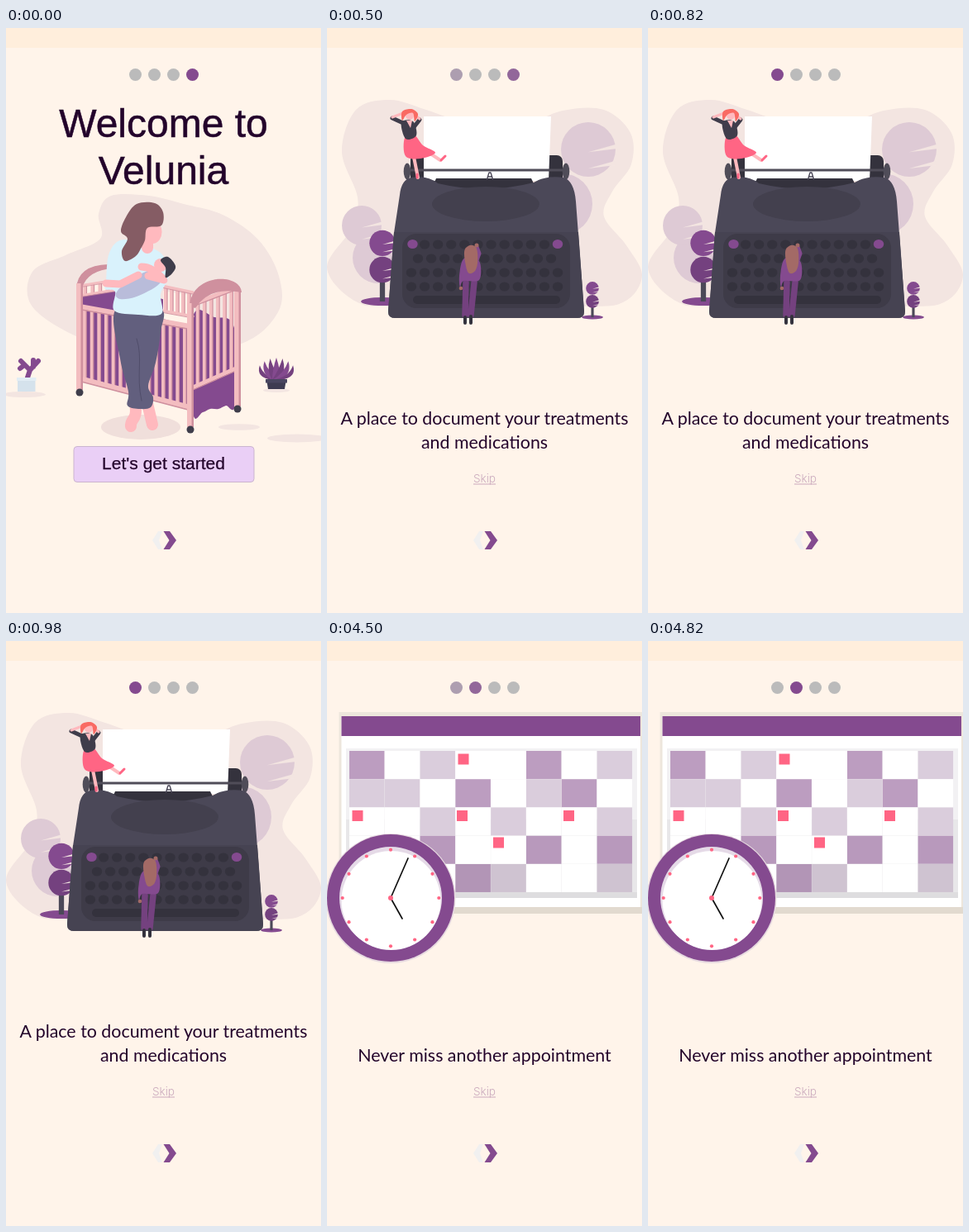
Animation, 381 px wide and 708 px high, one loop 8000 ms. Source, as an HTML page:

```html
<!DOCTYPE html>
<html lang="en">
<head>
<meta charset="utf-8">
<title>Onboarding</title>
<style>
html, body { margin: 0; width: 100%; height: 100%; overflow: hidden; background: #fff4ea; }
svg { display: block; width: 381px; height: 708px; }
text { text-anchor: middle; fill: #23042b; font-variant-ligatures: none; }
.title { font: 48px "Liberation Sans", Arial, sans-serif; stroke: #23042b; stroke-width: .5px; }
.button { font: 21px "Liberation Sans", Arial, sans-serif; stroke: #23042b; stroke-width: .25px; }
.caption { font: 21.4px Lato, "Open Sans", sans-serif; }
.skip { font: 300 13.6px Inter, sans-serif; fill: #cbaabd; }
</style>
</head>
<body>
<svg id="stage" viewBox="0 0 381 708"></svg>
<script>
const PURPLE = '#844a8f', PLUM = '#74417f', BLOB = '#f3e5e1', PINK = '#f3bdc0', ROSE = '#cf909e';
const SKIN = '#ffb9be', TAN = '#a36a66', RED = '#ff6584', DARK = '#34323d', INK = '#3f3d4b', SLATE = '#4b4858';
const LILAC = '#decad5', TROUSERS = '#625f7e', PAPER = '#ffffff';

const path = (d, fill) => `<path d="${d}" fill="${fill}"/>`;
const line = (d, color, w = 1) =>
  `<path d="${d}" fill="none" stroke="${color}" stroke-width="${w}" stroke-linecap="round" stroke-linejoin="round"/>`;
const oval = (x, y, rx, ry, fill) => `<ellipse cx="${x}" cy="${y}" rx="${rx}" ry="${ry}" fill="${fill}"/>`;
const disc = (x, y, r, fill) => oval(x, y, r, r, fill);
const box = (x, y, w, h, fill, r = 0, extra = '') =>
  `<rect x="${x}" y="${y}" width="${w}" height="${h}" rx="${r}" fill="${fill}" ${extra}/>`;
const text = (s, y, cls) => `<text x="190.5" y="${y}" class="${cls}">${s}</text>`;
const repeat = (n, f) => Array.from({ length: n }, (_, i) => f(i)).join('');
const lerp = (a, b, u) => a + (b - a) * u;
const skip = () => text('Skip', 550, 'skip') + box(177, 551.5, 27, 1, '#cbaabd');

// Closed smooth curve through a few points
function smooth(points, fill) {
  const p = points.split(' ').map(s => s.split(',').map(Number)), n = p.length;
  const at = i => p[(i + n) % n];
  const bend = (i, k) => [0, 1].map(a => at(i)[a] + k * (at(i + 1)[a] - at(i - 1)[a]) / 6);
  return path(`M${p[0]}` + repeat(n, i => `C${bend(i, 1)} ${bend(i + 1, -1)} ${at(i + 1)}`) + 'Z', fill);
}

// Slats between two sloping rails; top and bottom are [left y, right y]
function rack(n, x0, x1, top, bottom, rail) {
  const beam = (y, w) => line(`M${x0} ${y[0]}L${x1} ${y[1]}`, PINK, w)
    + line(`M${x0} ${y[0] + w * .6}L${x1} ${y[1] + w * .6}`, ROSE, w / 4);
  return repeat(n, i => {
    const u = (i + .7) / (n + .4), x = lerp(x0, x1, u);
    const y = lerp(...top, u), h = lerp(...bottom, u) - y;
    return box(x - 2, y, 4, h, PINK) + box(x + 1.5, y, 1.2, h, ROSE);
  }) + beam(top, rail) + beam(bottom, rail);
}

function post(x, top, bottom) {
  return box(x, top, 8, bottom - top, PINK) + box(x + 5.5, top, 2.5, bottom - top, ROSE)
    + disc(x + 4, bottom + 3, 4.5, INK);
}

function crib() {
  return path('M91 320L140 316 222 336 222 462 90 427Z', PURPLE)
    + path('M190 318L226 324V362L190 352Z', '#fff4ea')
    + smooth('226,350 252,350 276,363 277,455 266,457 257,461 247,461 238,465 226,464', PURPLE)
    + path('M91 313L135 305V318L91 324Z', '#fff4ea')
    + rack(5, 89, 138, [312, 304], [324, 316], 3)
    + path('M85 316Q86 287 124 286L130 291Q98 293 92 315Z', ROSE)
    + rack(5, 188, 226, [312, 320], [342, 349], 3.5)
    + rack(6, 226, 278, [334, 314], [435, 412], 5)
    + post(276, 316, 458)
    + path('M222 337C224 296 284 296 285 320Q246 312 229 339Z', ROSE)
    + rack(15, 89, 222, [337, 361], [424, 459], 6)
    + post(85, 309, 438) + post(219, 333, 483);
}

function mother() {
  return line('M156 455C160 475 150 472 151 482M170 450L177 480', SKIN, 14)
    + smooth('133,340 187,340 187,368 181,405 172,433 178,447 175,459 162,461 147,457 148,440 138,400', TROUSERS)
    + line('M158 376C166 400 157 420 164 451', '#504d6a')
    + smooth('121,306 125,272 143,256 184,270 195,288 196,304 187,322 188,346 160,347 131,342 132,319 120,316', '#d9f2fc')
    + line('M171 250V266', SKIN, 14) + oval(177, 247, 11.5, 14, SKIN)
    + smooth('145,229 158,213 180,212 190,223 188,239 171,242 168,257 163,267 157,276 144,282 140,270 147,255 139,246', '#855c64')
    + smooth('133,321 146,308 172,294 188,298 184,311 158,325 138,328', '#b9bcda')
    + line('M121 309L138 310 160 299M164 289Q178 289 191 305L172 300', SKIN, 9)
    + disc(187, 287, 8, SKIN)
    + smooth('187,281 196,277 205,288 201,297 193,302 193,290', INK);
}

function plants() {
  const leaf = i => {
    const a = (i - 3) * .28, x = 327 + 27 * Math.sin(a), y = 427 - 28 * Math.cos(a);
    return path(`M322 426Q${x - 5} ${y + 15} ${x} ${y}Q${x + 5} ${y + 15} 332 426Z`, i % 2 ? PURPLE : PLUM);
  };
  return oval(22, 443.5, 26, 3.5, BLOB) + oval(327, 438.5, 16, 2.5, BLOB)
    + line('M26 423L29 414 18 403M29 414L39 403M33 410V402M22 408L17 412', PURPLE, 6)
    + box(14, 424, 21.5, 16, '#d5e2ec') + box(13, 423, 23.5, 4, '#e2edf4')
    + repeat(7, leaf) + path('M315 425H339L337 437H317Z', '#3d3b51') + box(314, 425, 26, 4.5, '#494660');
}

function welcome() {
  return smooth('112,225 127,203 173,203 215,213 262,226 305,256 330,300 329,344 282,383 170,400 85,373 31,336 32,295 72,275 114,255', BLOB)
    + oval(163, 483, 48, 15, '#f0dfdb') + oval(282, 483, 25, 3.8, BLOB) + oval(352, 496.5, 36, 5, BLOB)
    + plants() + crib() + mother()
    + text('Welcome to', 131.5, 'title') + text('Velunia', 189, 'title')
    + box(82, 506.5, 218, 43, '#eacff6', 4, 'stroke="#cbb5cf"')
    + text("Let's get started", 534, 'button');
}

// Round crown with two thin cuts on its right side
function crown(x, y, r, fill) {
  const cut = k => path(`M${x} ${y + r * (k + .1)}L${x + r * 1.05} ${y + r * (k - .2)}v${r * .17}Z`, BLOB);
  return disc(x, y, r, fill) + cut(0) + cut(.6);
}

function tree(x, ground, r) {
  return oval(x, ground, r * 1.65, r * .32, PURPLE)
    + box(x - r * .2, ground - r * 2.2, r * .4, r * 2.2, SLATE)
    + crown(x, ground - r * 2.45, r, PLUM) + crown(x, ground - r * 4.5, r, PURPLE);
}

function keys() {
  const key = (x, y, fill) => oval(x, y, 6.2, 5.6, fill);
  return repeat(4, j => repeat(Math.min(10 + j, 12), i =>
    key(190.5 + (i - Math.min(9 + j, 11) / 2) * 16.1, 262 + j * 17, DARK)))
    + key(103.5, 261.5, PURPLE) + key(279, 261.5, PURPLE)
    + box(104, 324, 178, 10, DARK, 5);
}

function dancer() {
  return line('M92 115L79 109M105 120L112 111', INK, 5) + line('M79 108L92 103M112 110L104 103', SKIN, 3)
    + line('M104 151L110 181M119 148L137 160', SKIN, 4) + line('M109 177V181M138 160L143 155', RED, 3)
    + smooth('94,133 106,130 116,142 131,151 113,158 95,155', RED)
    + smooth('90,114 104,113 108,130 95,134', INK)
    + path('M96 112H103L101 121Z', SKIN) + disc(100, 106, 5, SKIN)
    + smooth('91,112 91,101 102,98 110,104 106,113 104,103 96,105', '#f96a63');
}

function typist() {
  return line('M168 308L167 347M178 308L174 347', PLUM, 7.5)
    + line('M167 350V357M174 349V357', DARK, 4)
    + line('M180 284L184 273 181 265', PURPLE, 5) + disc(181, 263, 2.5, TAN)
    + smooth('164,281 174,277 185,284 184,305 165,306 161,314 160,300', PURPLE)
    + disc(162, 315, 2.3, TAN)
    + smooth('166,271 173,263 181,267 182,285 178,295 170,295', TAN);
}

function typewriter() {
  const knob = x => oval(x, 173.5, 4.3, 10, '#504d59');
  return box(101, 154, 30, 38, DARK, 5) + box(257, 154, 28, 36, DARK, 7)
    + path('M117 107H271L268 185H117Z', PAPER)
    + box(98, 170.5, 192, 3, '#504d59') + knob(97) + knob(289)
    + path('M132 182H247L255 198H125Z', DARK)
    + line('M193.5 183L196 175H198L200.5 183M195 180H199', SLATE, 1.4)
    + path('M102 181Q122 178 134 188 192 202 250 187 265 178 286 181 299 185 301 210L304 250 311 343Q311 351 303 351H82Q74 351 74 343L81 248 88 202Q90 183 102 181Z', SLATE)
    + path('M81 247H304L311 343Q311 351 303 351H82Q74 351 74 343Z', '#464352')
    + oval(192, 213, 65, 21, '#43404e')
    + box(91, 249, 203, 90, '#3e3b48', 17) + keys();
}

function journal() {
  return smooth('18,150 35,99 76,87 120,99 181,119 235,119 285,100 335,99 367,127 368,165 345,198 335,228 362,263 381,300 358,332 298,337 91,337 35,331 0,290 30,242 37,205', BLOB)
    + disc(284, 213, 37, LILAC) + crown(316, 147, 33, LILAC)
    + disc(62, 278, 31, LILAC) + crown(42, 239, 24, LILAC)
    + tree(67, 331, 15.7) + tree(321, 350, 7.8)
    + typewriter() + dancer() + typist()
    + text('A place to document your treatments', 480, 'caption')
    + text('and medications', 509, 'caption') + skip();
}

function clock() {
  const tick = i => disc(77 + 58.3 * Math.sin(i * Math.PI / 6), 311 - 58.3 * Math.cos(i * Math.PI / 6), 2.1, RED);
  return disc(77, 311.5, 78.5, '#e7dae0') + disc(77, 311, 77, PURPLE)
    + disc(77, 311, 62, '#e5dae7') + disc(77.5, 314, 60, PAPER)
    + repeat(12, tick) + line('M98 263L77 311 91 336', '#111', 1.7) + disc(77, 311, 3, RED);
}

function calendar() {
  const rows = ['MWL  MWL', 'LLWMWLMW', 'WWLWLWWL', 'WWMWWMWM', 'WWWMLWWL'];
  const tones = { M: '#bc9dc0', L: '#dacddc', W: PAPER };
  const cell = (c, i, j) => c === ' ' ? '' : box(27 + i * 42.8, 133 + j * 34.25, 42.5, 33.95, tones[c])
    + (c !== 'W' && j > 2 ? box(27 + i * 42.8, 133 + j * 34.25, 42.5, 33.95, `rgba(0,0,0,${(j - 2) * .025})`) : '');
  const mark = (x, y) => box(x, y, 13, 13, RED);
  return box(14.5, 86, 367, 244, '#ede6dc') + box(14.5, 322, 367, 8, '#e2dacf')
    + box(17.5, 91, 361.5, 231, PAPER) + box(17.5, 91, 361.5, 24, PURPLE)
    + box(23, 130, 352, 181, '#f2f1f3') + box(23, 216, 352, 95, '#e8e7e9') + box(23, 304, 352, 7, '#dedddf')
    + box(155, 133, 86, 34, PAPER)
    + rows.map((row, j) => [...row].map((c, i) => cell(c, i, j)).join('')).join('')
    + mark(158.5, 136.5) + mark(30.5, 205) + mark(157, 205) + mark(286, 205) + mark(201, 237.5)
    + clock() + text('Never miss another appointment', 509, 'caption') + skip();
}

const stage = document.getElementById('stage');
stage.innerHTML = box(0, 0, 381, 708, '#fff4ea') + box(0, 0, 381, 24, '#ffeedc')
  + [welcome, journal, calendar].map(draw => `<g class="scene">${draw()}</g>`).join('')
  + repeat(4, i => `<circle class="dot" cx="${156.5 + i * 23}" cy="56.5" r="7.5"/>`)
  + path('M189 609H184L177 620 184 631H189L185 620Z', '#f1f0f0')
  + path('M190.5 609H198L206 620 198 631H190.5L197.5 620Z', PURPLE);

const scenes = stage.querySelectorAll('.scene');
const dots = stage.querySelectorAll('.dot');
const STARTS = [0, 500, 4340], STEP = 160;
const ease = u => u * u * (3 - 2 * u);
const tint = u => `rgb(${[132, 74, 143].map(c => Math.round(lerp(187, c, u)))})`;

function render(t) {
  const index = STARTS.findLastIndex(start => t >= start);
  const step = Math.floor((t - STARTS[index]) / STEP) + 1;
  const p = index ? ease(Math.min(step / 3, 1)) : 1;
  const active = (index + 3) % 4, previous = (index + 2) % 4;
  scenes.forEach((s, i) => s.setAttribute('visibility', i === index ? 'visible' : 'hidden'));
  dots.forEach((d, i) => d.setAttribute('fill', tint(i === active ? p : i === previous ? 1 - p : 0)));
}

const origin = performance.now();
function frame() {
  render((performance.now() - origin) % 8000);
  requestAnimationFrame(frame);
}
frame();
</script>
</body>
</html>
```
